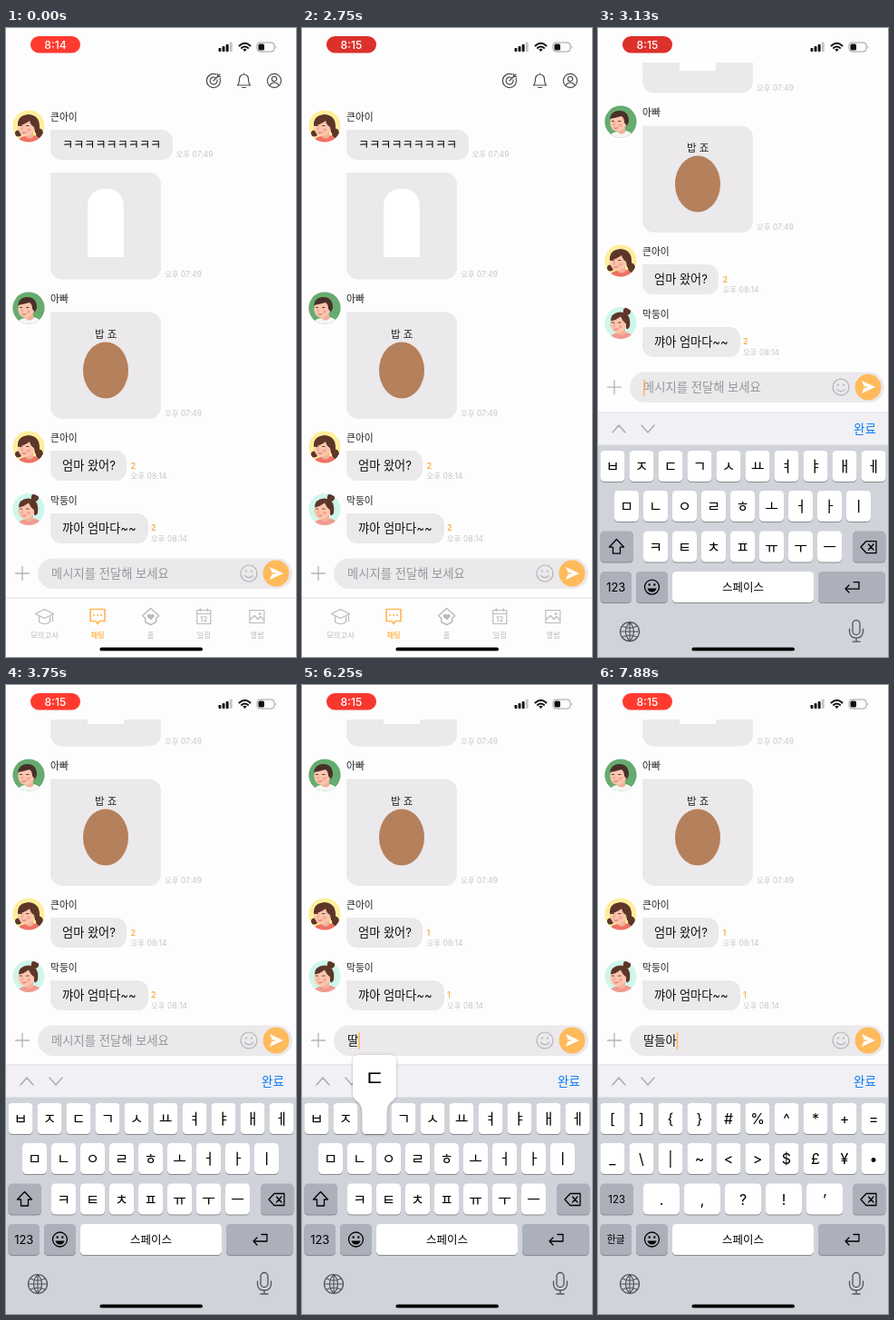
An HTML page for the animation above (8 s loop, 320 px wide and 692 px high).

```html
<!DOCTYPE html>
<html lang="ko">
<head>
<meta charset="utf-8">
<title>Family chat</title>
<style>
html, body { margin: 0; width: 100%; height: 100%; overflow: hidden; background: #fefdfe; }
svg { display: block; width: 100vw; height: 100vh; }
text { font-family: Inter, 'Noto Sans CJK KR', 'Noto Sans CJK JP', 'Noto Sans CJK', sans-serif; white-space: pre; }
.line { fill: none; stroke-linecap: round; stroke-linejoin: round; }
</style>
</head>
<body>
<svg id="stage" viewBox="0 0 320 692" preserveAspectRatio="none"></svg>
<script>
const LOOP = 8000;
const BUBBLE = '#ebe9eb', ORANGE = '#ffba5b', INK = '#111', PALE = '#c6c4c8', TAB = '#bab8bd';

const rect = (x, y, w, h, r, fill, more = '') =>
  `<rect x="${x}" y="${y}" width="${w}" height="${h}" rx="${r}" fill="${fill}" ${more}/>`;
const circle = (x, y, r, fill, more = '') => `<circle cx="${x}" cy="${y}" r="${r}" fill="${fill}" ${more}/>`;
const ring = (x, y, r, color, width = 1.2) => circle(x, y, r, 'none', `stroke="${color}" stroke-width="${width}"`);
const ellipse = (x, y, rx, ry, fill) => `<ellipse cx="${x}" cy="${y}" rx="${rx}" ry="${ry}" fill="${fill}"/>`;
const fillPath = (d, fill) => `<path d="${d}" fill="${fill}"/>`;
const line = (d, color, width = 1.2) => `<path class="line" d="${d}" stroke="${color}" stroke-width="${width}"/>`;
const escapeText = s => s.replace(/&/g, '&amp;').replace(/</g, '&lt;');
const text = (x, y, s, size, fill, more = '') =>
  `<text x="${x}" y="${y}" font-size="${size}" fill="${fill}" ${more}>${escapeText(s)}</text>`;
const centered = (x, y, s, size, fill, more = '') =>
  text(x, y + size * 0.38, s, size, fill, 'text-anchor="middle" ' + more);
const at = (x, y, body) => `<g transform="translate(${x} ${y})">${body}</g>`;

// Avatars look to the left, centred on 0,0 inside a circle of radius 17.6
const SKIN = '#fbc5ad', HAIR = '#5d3629';
const face = line('M-9.500-.5h2M-2.500-.5h2.500', '#4b2d25', 0.9) +
  line('M-6.500 1l-1.500 3h1.500', '#d98d78', 0.7) + line('M-7 7q2 1.200 4-.5', '#d45b55', 0.9) +
  circle(0, 4, 1.7, '#f7a08f');
const bust = shirt => fillPath('M-12 18Q-11 11-3 11L5 10Q13 11 14 18Z', shirt) +
  fillPath('M-3 6h8v6q-4 3-8 0z', '#f4b198');
const head = ellipse(-3, 1.5, 8.7, 9.5, SKIN) + circle(5.5, 2.5, 2.3, SKIN);
const looks = {
  pigtails: ['#ffee9c', circle(-11.5, 8, 3.5, HAIR) + ellipse(12, 8, 4, 5.5, HAIR) + bust('#ef7166') + head +
    fillPath('M-12 0Q-13-12 0-13Q13-12 12 3Q10 8 7 7L6 1Q2-1 1-6Q-4-2-12 0Z', HAIR) + face],
  short: ['#66ab70', bust('#f6f6f5') + head +
    fillPath('M-12-3Q-11-11-3-12Q9-13 9 0L7 5L4 1Q4-4 1-6Q-6-4-12-3Z', '#493029') + face],
  bun: ['#cff6eb', circle(7, -13, 4.2, HAIR) + bust('#f29a93') + head +
    fillPath('M-11-2Q-11-11-1-12Q12-12 10 4Q8 8 6 6V1Q2-2 0-7Q-5-3-11-2Z', HAIR) + face]
};
const avatar = (y, look) => at(25, y, circle(0, 0, 17.6, looks[look][0]) +
  `<g clip-path="url(#round)">${looks[look][1]}</g>`);

// Bubble with a square top left corner
const card = (y, w, h, r) => fillPath(
  `M49 ${y}h${w - r}a${r} ${r} 0 0 1 ${r} ${r}v${h - 2 * r}a${r} ${r} 0 0 1 ${-r} ${r}h${2 * r - w}a${r} ${r} 0 0 1 ${-r} ${-r}z`,
  BUBBLE);
const sender = (y, name, look) => avatar(y, look) + text(49, y - 6, name, 10.8, '#222');
const bubble = (y, w, s) => card(y, w, 33, 12) + text(62, y + 21.3, s, 13.2, INK);
const stamp = (x, y, s) => text(x, y, '오후 ' + s, 8.5, PALE);
const unread = (x, y) => text(x, y, '2', 9, '#f5b04a', 'class="unread" font-weight="600"');

const headerIcons = at(229, 58,
    line('M3-7A7.600 7.600 0 1 0 7-3M2-3.500A4 4 0 1 0 4-1M0 0L7-7M4.500-7.500V-4.500H7.500', '#4d4b50')) +
  at(262.500, 58, line('M-7 5Q-5 3-5-2A5 5 0 0 1 5-2Q5 3 7 5ZM-2 7.500H2M0-7V-8', '#4d4b50')) +
  at(296, 58, ring(0, 0, 7.6, '#4d4b50') + ring(0, -2, 2.7, '#4d4b50') + line('M-5 5Q-3 2 0 2T5 5', '#4d4b50'));

const messages =
  sender(108, '큰아이', 'pigtails') + bubble(112, 135, 'ㅋㅋㅋㅋㅋㅋㅋㅋㅋ') + stamp(187.5, 142, '07:49') +
  card(159, 122, 117.5, 13) + fillPath('M90 252V198Q90 177 110 177T130 198V252Z', '#fff') + stamp(175, 274, '07:49') +
  sender(308, '아빠', 'short') + card(312.5, 122, 117.5, 13) +
  text(98, 341, '밥 죠', 11.5, '#222') + ellipse(110, 376.5, 25, 31, '#b5805c') + stamp(175, 427, '07:49') +
  sender(461, '큰아이', 'pigtails') + bubble(465, 84, '엄마 왔어?') + unread(137.5, 485) + stamp(137.5, 495.5, '08:14') +
  sender(529.5, '막둥이', 'bun') + bubble(534, 108, '꺄아 엄마다~~') + unread(160, 553) + stamp(160, 564.5, '08:14');

const inputBar = rect(0, 576, 320, 50, 0, '#fefdfe') + line('M10.500 600H25.500M18 592.500V607.500', '#b5b3b8', 1.3) +
  rect(35, 583.5, 281, 33.5, 16.75, BUBBLE) +
  text(50, 605, '메시지를 전달해 보세요', 13.3, '#98969a', 'id="hint"') +
  text(50, 605, '', 13.3, INK, 'id="typed"') +
  rect(50, 591, 1.6, 19, 0.8, ORANGE, 'id="caret"') +
  at(268, 600, ring(0, 0, 9, '#b5b3b8') +
    line('M-4.500 2.500Q0 7 4.500 2.500', '#b5b3b8') + circle(-3, -2.5, 1.1, '#b5b3b8') + circle(3, -2.5, 1.1, '#b5b3b8')) +
  circle(298, 600, 14.4, ORANGE) + fillPath('M291 593L306 600L291 607L293.500 601L299 600L293.500 599Z', '#fff');

const tabIcons = [
  ['모의고사', line('M-10-3L0-8L10-3L0 2ZM-6 0V6Q0 10 6 6V0M9-2V5', TAB)],
  ['채팅', line('M-8-8H8V5H2L0 8L-2 5H-8Z', ORANGE, 1.7) + [-4, 0, 4].map(x => circle(x, -1.5, 1.1, ORANGE)).join('')],
  ['홈', line('M-9-1L0-9L9-1L6 2V6L0 9L-6 6V2Z', TAB, 1.5) +
    fillPath('M0 4L-4 0Q-4-4 0-2Q4-4 4 0Z', TAB)],
  ['일정', line('M-7.500-7H7.500V8H-7.500ZM-7.500-3H7.500M-4-9V-6M4-9V-6', TAB) +
    centered(0, 2.7, '12', 8, TAB, 'font-weight="600"')],
  ['앨범', line('M-8-7H8V7H-8ZM-8 4L-3-1L1 3L4 0L8 4', TAB) + circle(3, -3, 1.3, TAB)]
];
const tabs = line('M0 627H320', '#dedce0', 1) + tabIcons.map(([label, icon], i) => {
  const x = 42.5 + i * 58.6, on = i === 1;
  return at(x, 647.5, icon) + text(x, 670.8, label, 8.4, on ? ORANGE : TAB,
    `text-anchor="middle" font-weight="${on ? 700 : 400}"`);
}).join('');

// Keyboard
const GREY = '#abb0bb';
const rowY = [460, 504, 548.5, 593];
const key = (x, row, w, body = '', fill = '#fff') =>
  rect(x, rowY[row] + 1, w, 34, 4.5, '#8a8c91') + rect(x, rowY[row], w, 34, 4.5, fill) + body;
const wordKey = (x, row, w, label, size, fill = GREY) =>
  key(x, row, w, centered(x + w / 2, rowY[row] + 17, label, size, '#000'), fill);
const keyRow = (chars, row, x0, pitch = 32, w = 27) =>
  [...chars].map((c, i) => wordKey(x0 + i * pitch, row, w, c, 16, '#fff')).join('');

const arrowUp = 'M20.500 557.500L12.500 566H16.500V573H24.500V566H28.500Z';
const shiftKey = on => key(2.5, 2, 36.5, line(arrowUp, '#000', 1.3) + (on ? fillPath(arrowUp, '#000') : ''), on ? '#fff' : GREY);
const jamo = (top, shifted) => keyRow(top, 0, 2.5) + keyRow('ㅁㄴㅇㄹㅎㅗㅓㅏㅣ', 1, 18) +
  keyRow('ㅋㅌㅊㅍㅠㅜㅡ', 2, 50) + shiftKey(shifted) + wordKey(2.5, 3, 34.5, '123', 13);
const signs = (top, middle, toggle) => keyRow(top, 0, 2.5) + keyRow(middle, 1, 2.5) +
  keyRow('.,?!’', 2, 50, 45, 40) + wordKey(2.5, 2, 36.5, toggle, 11.5) + wordKey(2.5, 3, 34.5, '한글', 10.8);
const pages = {
  plain: jamo('ㅂㅈㄷㄱㅅㅛㅕㅑㅐㅔ', false),
  shifted: jamo('ㅃㅉㄸㄲㅆㅛㅕㅑㅒㅖ', true),
  numbers: signs('1234567890', '-/:;()₩&@"', '#+='),
  symbols: signs('[]{}#%^*+=', '_\\|~<>$£¥•', '123')
};

const sharedKeys = key(281, 2, 36.5,
    line('M290 566L296 559.500H307V572.500H296ZM298.500 563L304 569M304 563L298.500 569', '#000', 1.3), GREY) +
  key(42, 3, 35, ring(59.5, 610, 8, '#000', 1.3) +
    circle(56.7, 607.5, 1.2, '#000') + circle(62.3, 607.5, 1.2, '#000') +
    fillPath('M54.500 611.500H64.500Q63.500 615.500 59.500 615.500T54.500 611.500Z', '#000'), GREY) +
  wordKey(82, 3, 156, '스페이스', 12.5, '#fff') +
  key(243, 3, 74, line('M286 604.500H288V612H273M277 608L273 612L277 616M282 604.500H288', '#000', 1.3), GREY);

const globe = at(35, 659, ring(0, 0, 10.5, '#505258') +
  line('M0-10.500V10.500M-10.500 0H10.500M-8-6Q0-2 8-6M-8 6Q0 2 8 6M0-10.500Q-9 0 0 10.500Q9 0 0-10.500', '#505258', 1.1));
const mic = at(285, 658, rect(-4, -11.5, 8, 16, 4, 'none', 'stroke="#505258" stroke-width="1.3"') +
  line('M-7.500-2V1Q-7 8 0 8T7.500 1V-2M0 8V12M-4 12H4', '#505258', 1.3));

const keyboard = rect(0, 417.5, 320, 275, 0, '#d1d3da') + rect(0, 417.5, 320, 36, 0, '#f1f0f4') +
  line('M0 418H320', '#e2e1e5', 0.8) +
  line('M16 440L23 432L30 440M48 432L55 440L62 432', '#a9a8ad', 1.3) +
  text(282, 440.5, '완료', 13.5, '#0a7cf5', 'font-weight="500"') +
  Object.entries(pages).map(([name, body]) => `<g id="${name}">${body}</g>`).join('') +
  sharedKeys + globe + mic +
  `<g id="popup" filter="url(#soft)"><path fill="#fff" d="M-13.500 29V10Q-13.500 2-19-2Q-24-5-24-11V-46Q-24-53-17-53H17Q24-53 24-46V-11Q24-5 19-2Q13.500 2 13.500 10V29Q13.500 34 9 34H-9Q-13.500 34-13.500 29Z"/>
   <text id="popupChar" y="-19.5" font-size="24" text-anchor="middle"></text></g>`;

const statusBar = rect(27, 9, 55, 18.5, 9.25, '#ff3b30', 'id="pill"') +
  text(54.5, 22.7, '', 12.2, '#fff', 'id="clock" font-weight="500" text-anchor="middle"') +
  [4, 6, 8, 10.5].map((h, i) => rect(234.5 + i * 4.1, 26 - h, 2.9, h, 0.8, i < 3 ? '#111' : '#c4c3c6')).join('') +
  line('M257.500 19.500Q263.500 14 269.500 19.500', '#111', 2) + line('M259.800 22Q263.500 18.800 267.200 22', '#111', 1.9) +
  fillPath('M261.300 23.500Q263.500 21.900 265.700 23.500L263.500 26Z', '#111') +
  rect(277, 16, 19, 10, 3, 'none', 'stroke="#a09fa3" stroke-width="1"') + rect(278.5, 17.5, 6.5, 7, 1.6, '#111') +
  fillPath('M297.500 19.500Q299.500 21 297.500 22.500Z', '#a09fa3');

document.getElementById('stage').innerHTML = `<defs>
  <clipPath id="round"><circle r="17.6"/></clipPath>
  <clipPath id="below"><rect y="38" width="320" height="654"/></clipPath>
  <filter id="soft" x="-30%" y="-30%" width="160%" height="160%"><feDropShadow dx="0" dy="0.5" stdDeviation="1.5" flood-opacity=".3"/></filter></defs>` +
  rect(0, 0, 320, 692, 0, '#fefdfe') + tabs +
  `<g clip-path="url(#below)"><g id="chat">${headerIcons}${messages}${inputBar}</g></g>` +
  `<g id="keyboard">${keyboard}</g>` + statusBar + rect(103.5, 681.5, 113.5, 3.8, 1.9, '#000');

const $ = id => document.getElementById(id);
const unreadMarks = document.querySelectorAll('.unread');

// Each press: start, end, key centre x, row, label, text after release
const presses = [
  [5400, 5520, 80, 0, 'ㄸ', 'ㄸ'], [5650, 5770, 256, 1, 'ㅏ', '따'], [5900, 6020, 127.5, 1, 'ㄹ', '딸'],
  [6220, 6340, 80, 0, 'ㄷ', '딸ㄷ'], [6480, 6600, 256, 2, 'ㅡ', '딸드'], [6700, 6810, 127.5, 1, 'ㄹ', '딸들'],
  [6880, 6980, 95.5, 1, 'ㅇ', '딸들ㅇ'], [7050, 7160, 256, 1, 'ㅏ', '딸들아']
];

const setVisible = (el, on) => el.setAttribute('visibility', on ? 'visible' : 'hidden');
const pageAt = t => t >= 7680 ? 'symbols' : t >= 7380 ? 'numbers' : t >= 5150 && t < 5520 ? 'shifted' : 'plain';

// Critically damped spring: share of the travel still left
function springLeft(elapsed) {
  const u = Math.max(0, elapsed) * 0.01826;
  return (1 + u) * Math.exp(-u);
}

function render(t) {
  $('chat').setAttribute('transform', `translate(0 ${-209 * (1 - springLeft(t - 2810))})`);
  $('keyboard').setAttribute('transform', `translate(0 ${275 * springLeft(t - 2806)})`);

  const wave = 0.5 + 0.5 * Math.cos(Math.PI * (t - 1870) / 1000);
  const glow = Math.min(1, Math.max(0, wave * 1.4 - 0.2));
  $('pill').setAttribute('fill', `rgb(${220 + 35 * glow},${48 + 11 * glow},${42 + 6 * glow})`);
  $('clock').textContent = t < 1400 ? '8:14' : '8:15';
  unreadMarks.forEach(mark => mark.textContent = t < 5300 ? '2' : '1');

  const page = pageAt(t);
  for (const name in pages) $(name).style.display = name === page ? '' : 'none';

  const done = presses.filter(p => t >= p[1]);
  const typed = done.length ? done[done.length - 1][5] : '';
  $('typed').textContent = typed;
  setVisible($('hint'), !typed);
  const blink = t % 1000 > 100 && t % 1000 < 600;
  setVisible($('caret'), t > 2900 && (typed || blink));
  $('caret').setAttribute('x', 50 + (typed ? $('typed').getComputedTextLength() : 0));

  const held = presses.find(p => t >= p[0] && t < p[1]);
  setVisible($('popup'), held);
  if (held) {
    $('popup').setAttribute('transform', `translate(${held[2]} ${rowY[held[3]]})`);
    $('popupChar').textContent = held[4];
  }
}

const start = performance.now();
function tick() {
  render((performance.now() - start) % LOOP);
  requestAnimationFrame(tick);
}
tick();
</script>
</body>
</html>
```
